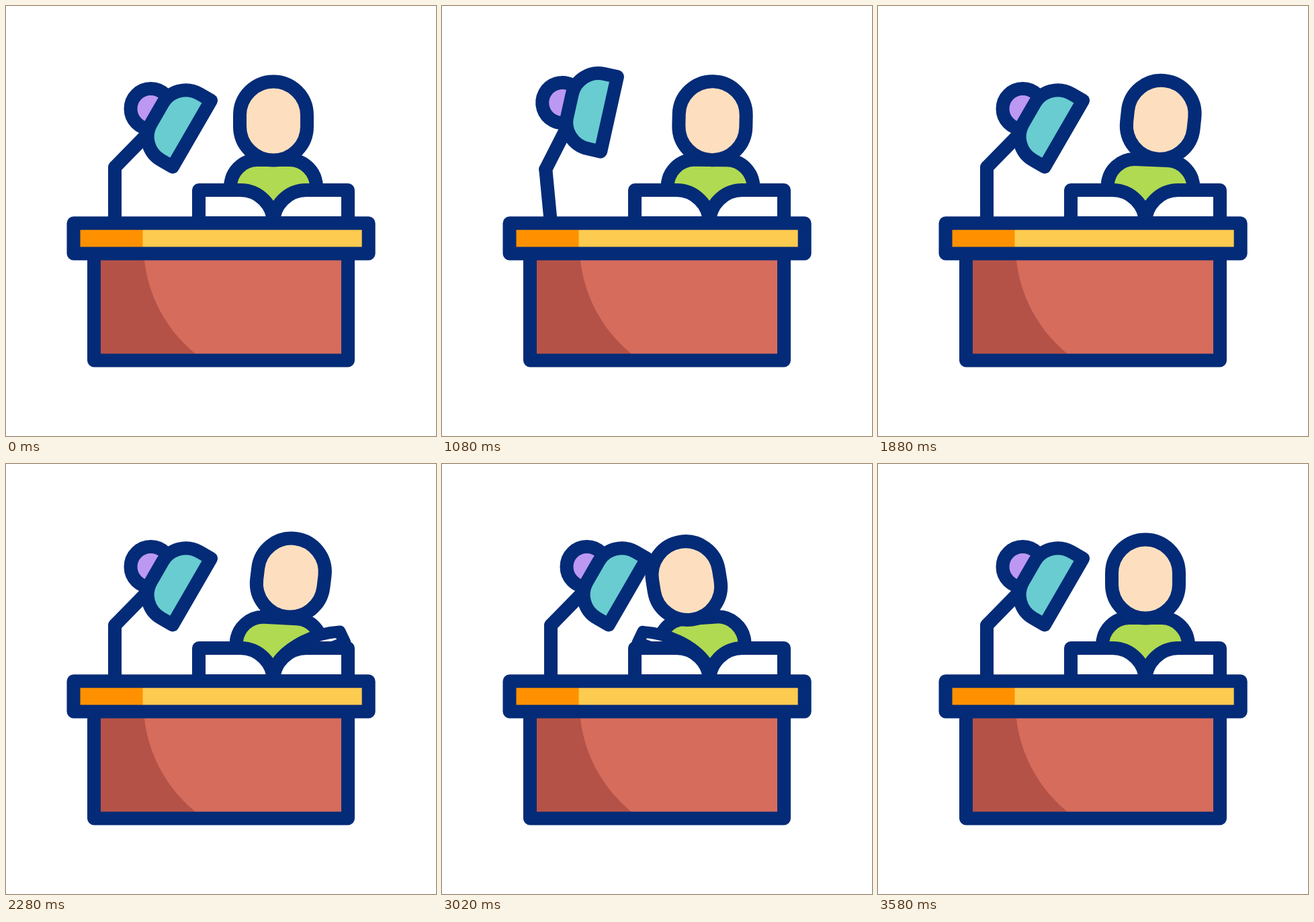
These frames come from a looping animation (640 by 640 pixels, 3.6 s). An HTML page:

```html
<!DOCTYPE html>
<html lang="en">
<head>
<meta charset="utf-8">
<title>Reading at a desk</title>
<style>
  html, body { margin: 0; width: 100%; height: 100%; overflow: hidden; background: #fff; }
  svg { display: block; width: 100vw; height: 100vh; }
  .line { stroke: #042b77; stroke-width: 20; stroke-linejoin: round; stroke-linecap: round; }
</style>
</head>
<body>
<svg viewBox="0 0 640 640">
  <g id="lamp" class="line" fill="none">
    <path d="M162 326V240"/>
    <g id="shade">
      <path d="M162 240L207 194"/>
      <circle cx="215.5" cy="153" r="30" fill="#bc98f2"/>
      <path transform="translate(276.5 190) rotate(30)" fill="#68ccd1"
            d="M0-57H-20A40 40 0 0 0-60-17V17A40 40 0 0 0-20 57H0Z"/>
    </g>
  </g>

  <path id="body" class="line" fill="#b0da51"
        d="M334 300V270C334 247 352 229 374 229H422C444 229 462 247 462 270V300Z"/>
  <rect id="head" class="line" fill="#fddfbf" x="348" y="112.5" width="100" height="117" rx="50"/>

  <path id="leaf" class="line" style="stroke-width:18" fill="#fff"/>
  <g class="line" fill="#fff">
    <path d="M287 323V274H349A49 49 0 0 1 398 323Z"/>
    <path d="M509 323V274H447A49 49 0 0 0 398 323Z"/>
  </g>

  <path fill="#d56c5c" d="M131 368H509V527H131Z"/>
  <path fill="#b55247" d="M131 368H205C209 428 237 480 281 517L292 527H131Z"/>
  <path class="line" fill="none" d="M131 368H509V527.5H131Z"/>
  <path fill="#fdcb50" d="M100 323H540V368H100Z"/>
  <path fill="#ff9100" d="M100 323H203.5V368H100Z"/>
  <path class="line" fill="none" d="M100.5 323.3H539.7V368.5H100.5Z"/>
</svg>
<script>
const LOOP = 3600;
const el = id => document.getElementById(id);
const [lamp, shade, body, head, leaf] = ['lamp', 'shade', 'body', 'head', 'leaf'].map(el);

// [time, value] keys
const STAND = [[160, 0], [660, -5.5], [1070, -5.5], [1480, 1.7], [1780, 0]];
const TILT = [[160, 0], [660, -12], [1070, -12], [1480, 1.2], [1780, 0]];
const LEAN = [[160, 0], [600, .03], [1080, .17], [1480, .47], [2200, 1.03], [3090, -1.33], [3570, 0]];
const TURN = [[2060, 0], [3240, Math.PI]];

const slope = (a, b) => (b[1] - a[1]) / (b[0] - a[0]);

// Zero slope at peaks and ends, harmonic mean elsewhere
function tangent(keys, i) {
  if (i === 0 || i === keys.length - 1) return 0;
  const l = slope(keys[i - 1], keys[i]), r = slope(keys[i], keys[i + 1]);
  return l * r > 0 ? 2 * l * r / (l + r) : 0;
}

function sample(keys, t) {
  const last = keys.length - 1;
  if (t <= keys[0][0]) return keys[0][1];
  if (t >= keys[last][0]) return keys[last][1];
  const i = keys.findIndex(k => k[0] > t) - 1;
  const [t0, v0] = keys[i], [t1, v1] = keys[i + 1];
  const d = t1 - t0, u = (t - t0) / d, w = 1 - u;
  return v0 * w * w * (1 + 2 * u) + v1 * u * u * (3 - 2 * u)
    + d * u * w * (w * tangent(keys, i) - u * tangent(keys, i + 1));
}

function leafPath(angle) {
  const c = Math.cos(angle), s = Math.sin(angle);
  const at = (x, y, rise) => `${398 + x * c} ${y - rise * s}`;
  return `M398 306C${at(10, 290, 30)} ${at(50, 274, 74)} ${at(103, 274, 86)}`
    + `L${at(111, 275, 32)}L398 306Z`;
}

function draw(t) {
  lamp.setAttribute('transform', `rotate(${sample(STAND, t)} 190 322)`);
  shade.setAttribute('transform', `rotate(${sample(TILT, t)} 162 240)`);

  const p = sample(LEAN, t);
  body.setAttribute('transform', `translate(${9 * p} 0) rotate(${3 * p} 398 265)`);
  head.setAttribute('transform', `translate(${26.5 * p} ${-2 * p}) rotate(${7 * p} 398 171)`);

  const angle = sample(TURN, t);
  leaf.setAttribute('visibility', angle > 0 && angle < Math.PI ? 'visible' : 'hidden');
  leaf.setAttribute('d', leafPath(angle));
}

const start = performance.now();
function tick() {
  draw((performance.now() - start) % LOOP);
  requestAnimationFrame(tick);
}
tick();
</script>
</body>
</html>
```
